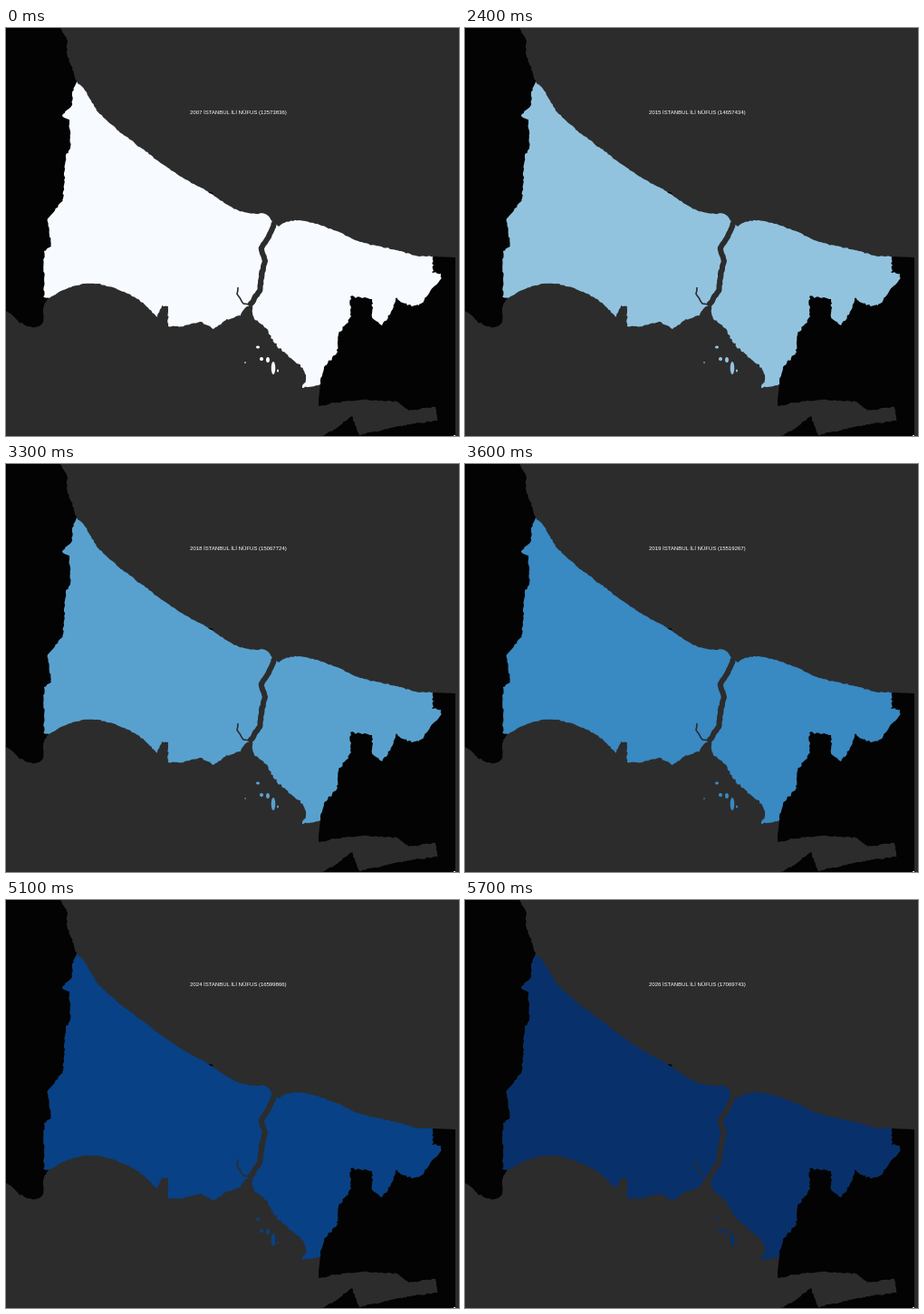
Write a matplotlib script that moves like this. It is 500x450 px and loops after 6000 ms.

```python
import numpy as np
import matplotlib.pyplot as plt
from matplotlib.animation import FuncAnimation
from matplotlib.patches import Ellipse, Polygon, Rectangle

W, H, DPI = 500, 450, 100
PX = 72 / DPI
SEA, LAND = "#2c2c2c", "#030303"
FIRST_YEAR = 2007

POPULATION = [
    12573836, 12697164, 12915158, 13255685, 13624240,
    13854740, 14160467, 14377018, 14657434, 14804116,
    15029231, 15067724, 15519267, 15462452, 15840900,
    15907950, 16134783, 16599866, 16377212, 17069743,
]

# Sequential blue ramp; each year takes the colour of its population rank.
BLUES = ["f7fbff", "deebf7", "c6dbef", "9ecae1", "6baed6",
         "4292c6", "2171b5", "08519c", "08306b"]
STOPS = [*np.arange(7) * .13, .90, 1]
RANK = np.argsort(np.argsort(POPULATION))

rng = np.random.default_rng(7)


def ramp(t):
    rgb = np.array([list(bytes.fromhex(c)) for c in BLUES]) / 255
    return tuple(np.interp(t, STOPS, rgb[:, k]) for k in range(3))


def coast(points, curve=0, amp=.8, step=2.5):
    """Join key points by straight (0) or rounded (1) runs with jagged noise."""
    p = np.array(points, float)
    tangent = np.gradient(p, axis=0)
    tangent /= np.linalg.norm(tangent, axis=1)[:, None]
    out = []
    for a, b, ta, tb in zip(p, p[1:], tangent, tangent[1:]):
        length = np.hypot(*(b - a))
        t = np.arange(0, 1, step / length)[:, None]
        ease = t * t * (3 - 2 * t) if curve else t
        bend = ta * t * (1 - t) ** 2 - tb * t * t * (1 - t)
        noise = rng.uniform(-amp, amp, (len(t), 2))
        noise[0] = 0
        out.append(a + (b - a) * ease + curve * length * bend + noise)
    return np.vstack([*out, p[-1:]])


west_border = coast([
    (78, 59), (73, 72), (73, 85), (62, 97), (70, 101), (71, 133), (66, 140),
    (63, 190), (46, 210), (50, 241), (42, 246), (42, 297), (47, 298)])
west_north = coast([(60, 0), (68, 14), (67, 27), (78, 59)])
west_south = coast([(47, 298), (41, 308), (39, 327), (22, 328), (0, 312)], 1)

north = np.vstack([
    coast([(78, 59), (86, 67), (104, 95), (150, 133), (190, 162), (220, 179),
           (256, 201), (276, 205), (286, 205), (294, 213)], 1, .6),
    coast([(301, 219), (307, 215), (324, 212), (354, 220), (395, 237),
           (432, 245), (452, 251), (471, 252)], 1, .7)])
east_border = coast([
    (471, 252), (471, 270), (480, 271), (480, 277), (466, 294), (456, 306),
    (443, 306), (430, 298), (424, 316), (415, 328), (404, 319), (404, 299),
    (380, 296), (381, 318), (367, 338), (365, 358), (351, 374), (347, 393)],
    amp=1.1)
south = np.vstack([
    coast([(347, 393), (327, 397), (331, 388), (328, 375), (312, 363),
           (297, 348), (287, 331), (274, 321), (271, 307)], amp=1.1),
    coast([(266, 307), (258, 317), (243, 322), (229, 332), (214, 324),
           (194, 329), (179, 329), (179, 307), (172, 306), (167, 319)]),
    coast([(167, 319), (148, 301), (130, 291), (98, 282), (70, 286),
           (47, 298)], 1, .6)])

strait = coast([(299, 209), (290, 230), (282, 243), (286, 257), (282, 272),
                (280, 290), (268, 307)], amp=.6)
horn = coast([(268, 305), (262, 304), (255, 293), (256, 286)], amp=.4)

gulf = coast([
    (340, 419), (358, 414), (392, 410), (432, 412), (444, 422), (474, 418),
    (476, 433), (440, 438), (390, 449), (382, 428), (364, 442), (347, 451),
    (340, 451)])

# x, y, width, height
ISLANDS = [(278, 352, 4, 3), (282, 365, 4, 4), (289, 366, 4, 6),
           (295, 375, 4.5, 14), (300, 378, 2, 3), (264, 369, 2, 1.3)]

fig = plt.figure(figsize=(W / DPI, H / DPI), dpi=DPI, facecolor=SEA)
ax = fig.add_axes([0, 0, 1, 1])
ax.set_xlim(0, W)
ax.set_ylim(H, 0)
ax.axis("off")


def shape(points, color):
    return ax.add_patch(Polygon(points, closed=True, fc=color, ec="none"))


def blob(x, y, w, h, color):
    return ax.add_patch(Ellipse((x, y), w, h, fc=color, ec="none"))


def channel(points, width):
    ax.plot(*points.T, color=SEA, lw=width * PX, solid_capstyle="butt")


shape(np.vstack([[(0, 0)], west_north, west_border, west_south]), LAND)
shape(np.vstack([east_border, [(345, 410), (346, 450), (496, 450),
                               (496, 253)]]), LAND)
shape(gulf, SEA)
blob(226, 183, 5, 4, LAND)

# The whole province is one shape, cut in two by the strait.
province = [shape(np.vstack([north, east_border, south, west_border[::-1]]),
                  "w")]
province += [blob(*island, "w") for island in ISLANDS]
channel(strait, 6)
channel(horn, 1.6)
ax.add_patch(Rectangle((494, 448.5), 2, 1.5, fc="#dddddd", ec="none"))

title = ax.text(256, 95.2, "", color="white", family="Liberation Sans",
                size=6 * PX, ha="center", va="baseline")


def draw(i):
    color = ramp(RANK[i] / (len(RANK) - 1))
    for part in province:
        part.set_facecolor(color)
    title.set_text(f"{FIRST_YEAR + i} İSTANBUL İLİ NÜFUS ({POPULATION[i]})")
    return [*province, title]


anim = FuncAnimation(fig, draw, frames=len(POPULATION), interval=300,
                     init_func=lambda: draw(0), repeat=True, repeat_delay=0,
                     blit=False)
plt.show()
```
